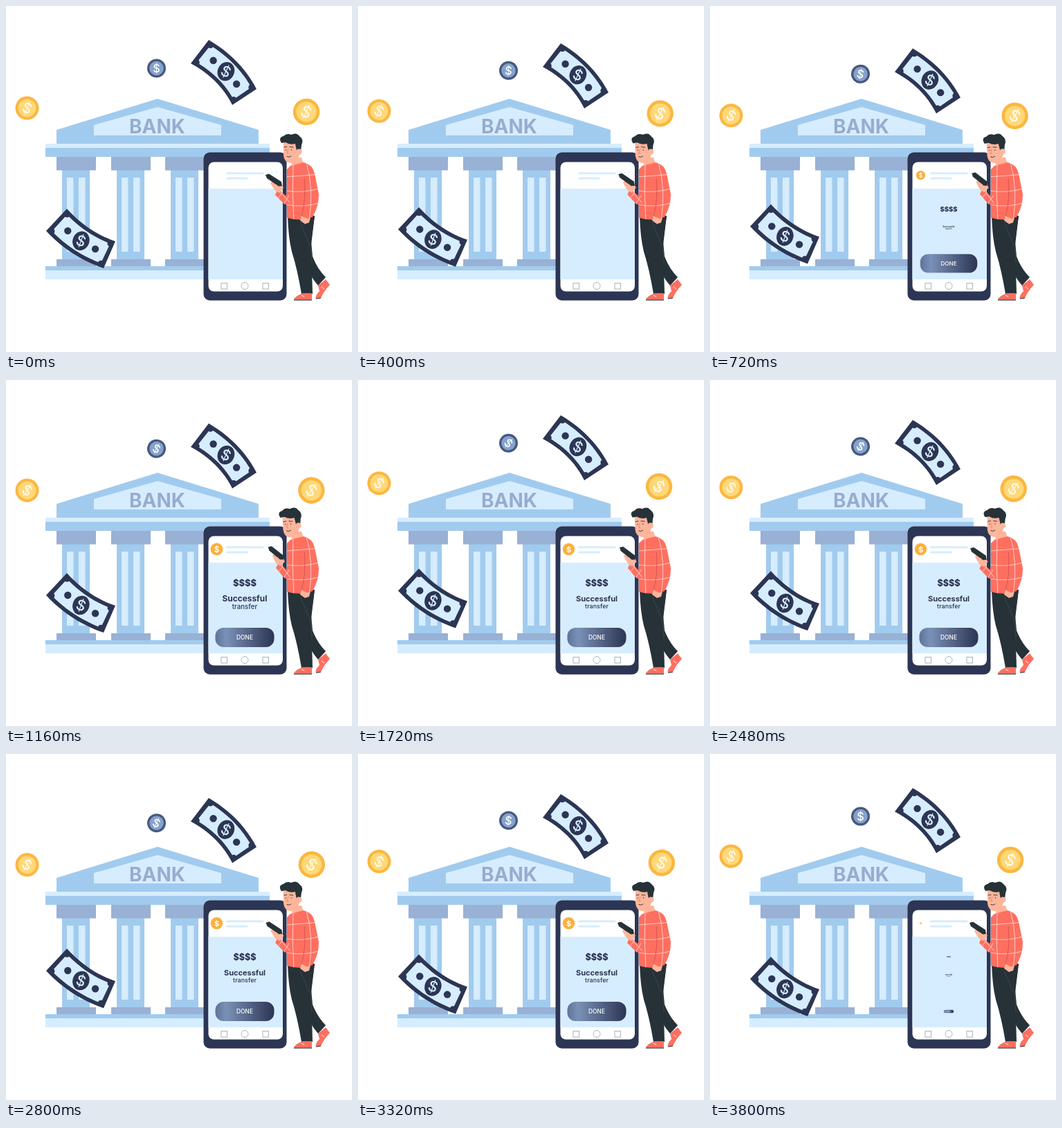
Animation of 500 by 500 pixels, one loop 3.84 s. Source, as an HTML page:

```html
<!DOCTYPE html>
<html lang="en">
<head>
<meta charset="utf-8">
<title>Bank transfer</title>
<style>
  html, body { margin: 0; height: 100%; overflow: hidden; background: #fff; }
  svg { display: block; width: 100vw; height: 100vh; }
  text { font-family: Inter, "Open Sans", sans-serif; font-weight: 700; text-anchor: middle; }
  .medium { font-weight: 500; }
  .heavy { font-weight: 800; }
  .navy { fill: #2c3553; }
  .blue { fill: #a1cbee; }
  .pale { fill: #d6edff; }
  .slate { fill: #98b1d4; }
  .skin { fill: #fdb59b; }
  .red { fill: #ff6f60; }
  .dark { fill: #263238; }
  .line { fill: none; stroke: #263238; stroke-width: .9; stroke-linecap: round; }
  .check { fill: none; stroke: #ffe3dd; stroke-width: .8; }
</style>
</head>
<body>
<svg viewBox="0 0 500 500">
  <defs>
    <linearGradient id="shine">
      <stop offset="0" stop-color="#5f7398"/>
      <stop offset=".18" stop-color="#7a91b7"/>
      <stop offset="1" stop-color="#2c3553"/>
    </linearGradient>
    <path id="torso" d="M411 231L430 226Q443 229 446 242L452 272Q452 290 443 305Q425 312 406 306V236Z"/>
    <path id="sleeve" d="M393 264L404 274L407 268L412 282Q409 290 402 286L389 273Z"/>
    <clipPath id="torsoClip"><use href="#torso"/></clipPath>
    <clipPath id="sleeveClip"><use href="#sleeve"/></clipPath>
  </defs>

  <g id="bank">
    <path class="blue" d="M73 179L219 134L365 179V199H73Z"/>
    <path class="pale" d="M127 172L219 146L311 172V187H127Z"/>
    <text x="218.5" y="184" font-size="28" fill="#98acd0">BANK</text>
    <path class="pale" d="M57 199H381V206H57ZM57 382H381V395H57Z"/>
    <path class="blue" d="M57 205H381V218H57ZM57 376H381V382H57Z"/>
  </g>

  <g id="phone">
    <rect class="navy" x="285.500" y="211.500" width="120" height="214" rx="9"/>
    <rect x="292.500" y="225.500" width="107.500" height="187" rx="8" fill="#fff"/>
    <path class="pale" d="M292.500 264H400V395H292.500Z"/>
    <path d="M319.500 241.800H371M319.500 249H348" stroke="#d6edff" stroke-width="3" stroke-linecap="round"/>
    <path d="M378 240.500h.1m6.500 0h.1m6.500 0h.1" stroke="#d6edff" stroke-width="2" stroke-linecap="round"/>
    <g fill="none" stroke="#aab1bd" stroke-width="1">
      <rect x="311" y="400.500" width="8.500" height="8.500"/>
      <circle cx="345" cy="404.500" r="5"/>
      <rect x="371" y="400.500" width="8.500" height="8.500"/>
    </g>
    <g id="badge">
      <circle r="8.700" fill="#fbb03b"/>
      <text y="4" font-size="11" fill="#fff">$</text>
    </g>
    <g id="amount"><text class="navy heavy" y="4.500" font-size="12.600">$$$$</text></g>
    <g id="message">
      <text class="navy" y="-.5" font-size="11">Successful</text>
      <text class="navy medium" y="9.800" font-size="9">transfer</text>
    </g>
    <g id="button">
      <rect x="-42.500" y="-14" width="85" height="28" rx="12" fill="url(#shine)"/>
      <text class="medium" y="3" font-size="8.400" fill="#fff">DONE</text>
    </g>
  </g>

  <g id="man">
    <path class="dark" d="M420 306L446 303L441 340L443 362Q450 380 462 392L451 404Q440 392 432 370Z"/>
    <path class="red" d="M451 404L462 395L468 403Q460 411 455 422L448 423Q446 419 453 412Z"/>
    <path class="dark" d="M407 303H446L441 345L443 416H427Q421 380 413 355Q408 335 407 303Z"/>
    <path d="M425 313L441 350L442 375" fill="none" stroke="#46535a" stroke-width=".6"/>
    <path class="red" d="M429 415H442V425H416Q416 420 429 415Z"/>
    <path d="M416 425H442M448 423L455 422" stroke="#263238" stroke-width="1"/>
    <path d="M427 418l4 2M456 406l4 3" stroke="#fff" stroke-width="1"/>
    <path class="skin" d="M412 219H427L430 228Q421 235 413 230Z"/>
    <use href="#torso" class="red"/>
    <path class="check" clip-path="url(#torsoClip)" d="M415 226Q413 270 416 312M434 226Q445 262 438 312M404 247L455 243M404 267Q430 271 455 263M404 287Q430 292 455 284"/>
    <path d="M431 249Q434 280 427 304" fill="none" stroke="#c94f48" stroke-width=".8"/>
    <path class="skin" d="M427 303Q435 309 440 306L438 313L432 315L425 310Z"/>
    <g id="head">
      <path class="skin" d="M401 195H424L425 213Q421 226 411 227Q402 226 401 216Z"/>
      <path class="dark" d="M398 198Q393 190 401 188Q406 183 412 186Q420 182 424 188Q431 193 427 201L426 210L420 209L418 199Q410 201 404 197Z"/>
      <circle class="skin" cx="423.500" cy="210.500" r="4"/>
      <path class="line" d="M402 204l4 -.6M410 203.500l5 .6M404.500 207.500v.8M412.500 207.500v.8M406 217.500q3 2 6 -.5"/>
      <path d="M408 206l-2 7h2.500" fill="none" stroke="#d9806c" stroke-width=".8"/>
    </g>
    <g id="arm">
      <use href="#sleeve" class="red"/>
      <path class="check" clip-path="url(#sleeveClip)" d="M390 262L412 286M402 266L393 278M410 272L400 288"/>
      <path class="skin" d="M382 256L386 251L397 255L401 263L395 270L389 267Z"/>
      <path class="dark" d="M375 244L380 242.500L398 254L399 260L394 260.500L377 249Z"/>
      <path class="skin" d="M384 257L391 258L392 261L386 261Z"/>
    </g>
  </g>
</svg>
<script>
const LOOP = 3840;
const svg = document.querySelector('svg');
const $ = id => document.getElementById(id);

function add(parent, markup, id = '') {
  parent.insertAdjacentHTML('beforeend', `<g id="${id}">${markup}</g>`);
}

function column(x) {
  const box = (cls, dx, y, w, h) =>
    `<rect class="${cls}" x="${x + dx}" y="${y}" width="${w}" height="${h}"/>`;
  add($('bank'), box('blue', 8, 237, 40, 129) + box('slate', 0, 218, 57, 19.5) +
    box('slate', 0, 366, 57, 10) + box('pale', 15, 248, 9.5, 107) + box('pale', 32, 248, 9.5, 107));
}

// Banknote between two curved long edges, each given as [start, control, end].
function bill(id, top, bottom, angle) {
  const edge = ([a, b, c], u) =>
    [0, 1].map(i => (1 - u) ** 2 * a[i] + 2 * u * (1 - u) * b[i] + u * u * c[i]);
  const at = (u, v) => {
    const p = edge(top, u), q = edge(bottom, u);
    return p.map((n, i) => n + (q[i] - n) * v);
  };
  const panel = (m, n) => {
    const us = Array.from({ length: 13 }, (_, i) => m + (1 - 2 * m) * i / 12);
    return [...us.map(u => at(u, n)), ...us.reverse().map(u => at(u, 1 - n))].join(' ');
  };
  const dot = (u, v, r) => {
    const [x, y] = at(u, v);
    return `<circle class="navy" cx="${x}" cy="${y}" r="${r}"/>`;
  };
  const [x, y] = at(.5, .5);
  add(svg, `<polygon class="navy" points="${panel(0, 0)}"/>
    <polygon class="pale" points="${panel(.065, .13)}"/>
    ${[.065, .935].map(u => dot(u, .13, 4) + dot(u, .87, 4)).join('')}
    ${dot(.24, .5, 5.2)}${dot(.76, .5, 5.2)}
    <g transform="translate(${x} ${y}) rotate(${angle})">
      <ellipse class="navy" rx="12" ry="14"/>
      <text class="pale medium" y="7.5" font-size="21">$</text>
    </g>`, id);
}

function coin(id, r, rim, face, sign) {
  add(svg, `<circle r="${r}" fill="${rim}"/><circle r="${r * .76}" fill="${face}"/>
    <text class="medium" y="${r * .43}" font-size="${r * 1.2}" fill="${sign}">$</text>`, id);
}

[73, 152, 230].forEach(column);
bill('billTop', [[293, 49], [339, 76], [362, 120]], [[267, 83], [308, 105], [327, 143]], 25);
bill('billLow', [[88, 293], [119, 327], [158, 340]], [[58, 325], [92, 362], [141, 379]], 20);
coin('coinLeft', 17, '#fcb73f', '#ffd878', '#fff8e6');
coin('coinRight', 19.2, '#fcb73f', '#ffd878', '#fff8e6');
coin('coinBlue', 13.5, '#475880', '#86a2ca', '#fff');

const wave = (t, period) => (1 - Math.cos(2 * Math.PI * t / period)) / 2;
const clamp = x => Math.min(1, Math.max(0, x));
const backOut = x => 1 + 2.7 * (x - 1) ** 3 + 1.7 * (x - 1) ** 2;

function pop(t, start) {
  if (t > 3400) return 1 - ((t - 3400) / 440) ** 2;
  return backOut(clamp((t - start) / 700));
}

function place(id, x, y, angle = 0, scale = 1) {
  $(id).setAttribute('transform', `translate(${x} ${y}) rotate(${angle}) scale(${Math.max(0, scale)})`);
}

function draw(now) {
  const t = now % LOOP;
  const fast = wave(t - 25, LOOP / 2), slow = wave(t, LOOP);
  place('billTop', 0, 15 * fast);
  place('billLow', 0, -21 * slow);
  place('coinLeft', 30.5, 147.5 + 13 * fast, 22 + 18 * slow);
  place('coinRight', 434 + 8 * fast, 153 + 7 * fast, 25 + 15 * slow);
  place('coinBlue', 217.5, 90 + 10 * fast, 42 * slow);

  place('badge', 304.5, 244.5, 0, pop(t, 565));
  place('amount', 345, 293.5, 0, pop(t, 565));
  place('message', 345, 320.5, 0, pop(t, 675));
  place('button', 345, 372, 0, pop(t, 480));

  const lift = t < 960 ? wave(t, 1920) : 1 - wave(clamp((t - 960) / 2400), 2);
  $('arm').setAttribute('transform', `rotate(${5.5 * lift} 405 283)`);
  $('head').setAttribute('transform', `rotate(${-3 * lift} 418 226)`);
}

const begin = performance.now();
function frame() {
  draw(performance.now() - begin);
  requestAnimationFrame(frame);
}
frame();
</script>
</body>
</html>
```
